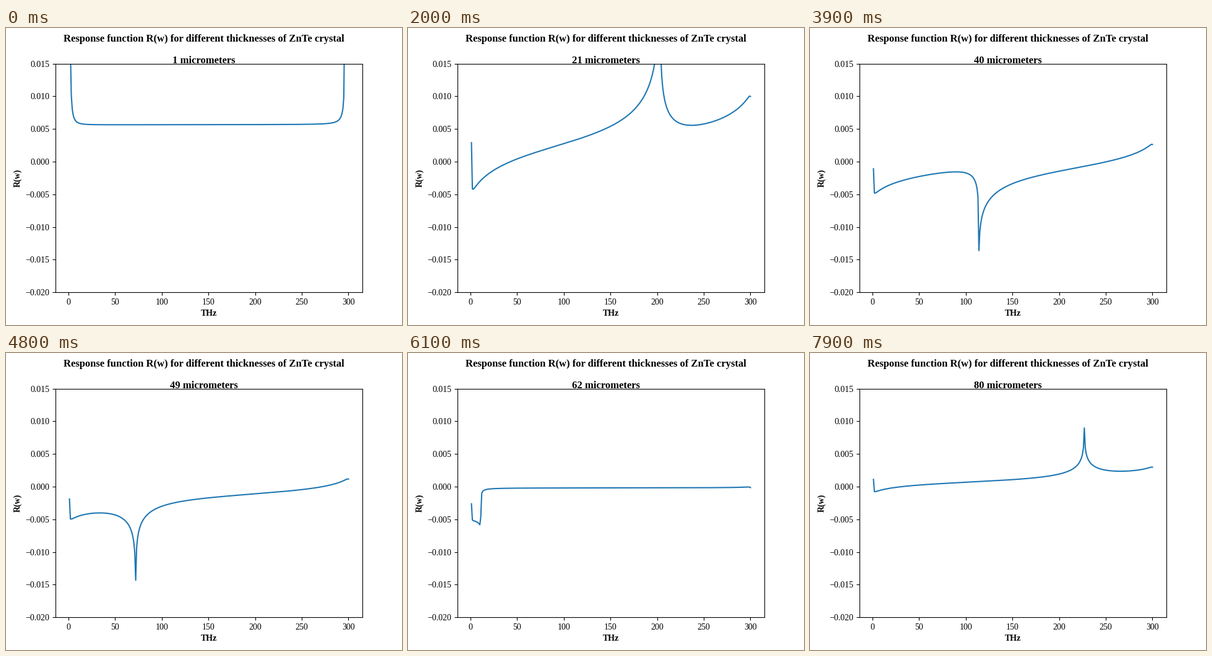
Write a matplotlib script that moves like this. It is 640 by 480 pixels and loops after 8000 ms.

```python
import numpy as np
import matplotlib.pyplot as plt
from matplotlib.animation import FuncAnimation

plt.rcParams["font.family"] = "Liberation Serif"

FRAMES = 80
TITLE = "Response function R(w) for different thicknesses of ZnTe crystal"
MISMATCH = 2 * np.pi * 0.01559  # phase slip per THz and micrometer
GAIN = 0.01098

freq = np.arange(1, 301)


def response(thickness):
    """Real part of the transformed phase-matching factor."""
    phase = -1j * MISMATCH * thickness * freq
    return GAIN * np.fft.fft((np.exp(phase) - 1) / phase).real


fig, ax = plt.subplots(figsize=(6.4, 4.8), dpi=100)
line, = ax.plot(freq, response(1))
ax.set_ylim(-0.02, 0.015)
ax.set_xlabel("THz", fontweight="bold")
ax.set_ylabel("R(w)", fontweight="bold")
title = fig.suptitle("", fontsize=12, fontweight="bold", linespacing=1.15)


def update(i):
    thickness = i + 1
    line.set_ydata(response(thickness))
    title.set_text(f"{TITLE}\n\n{thickness} micrometers")
    return line, title


anim = FuncAnimation(fig, update, frames=FRAMES, interval=100,
                     repeat=True, repeat_delay=0, blit=False)
plt.show()
```
